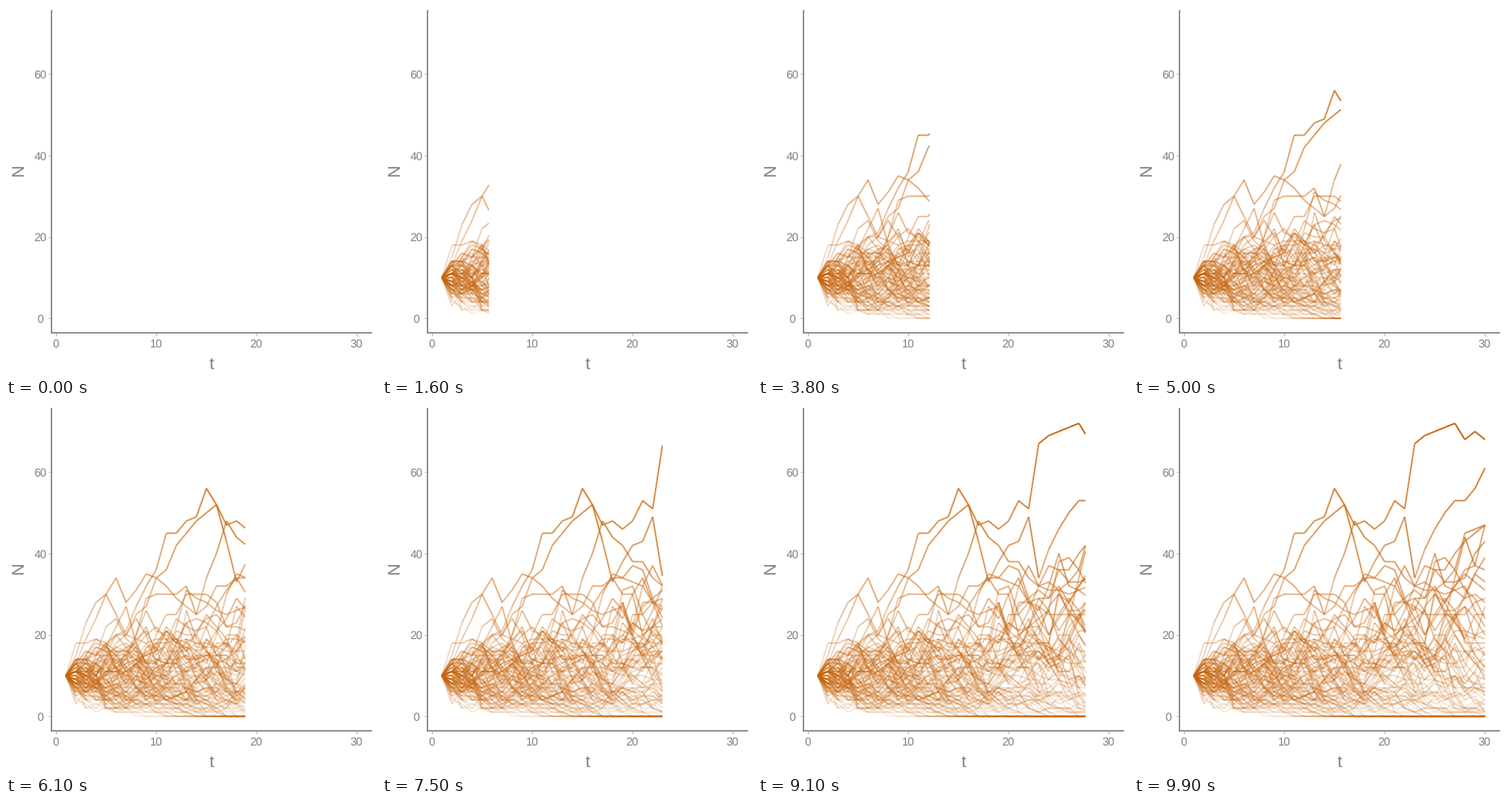
Recreate the animation shown at these times as a matplotlib script. Size 480 px wide and 480 px high, loop 10 s.

```python
import numpy as np
import matplotlib.pyplot as plt
from matplotlib.animation import FuncAnimation
from matplotlib.collections import LineCollection
from matplotlib.colors import to_rgb

SIZE, DPI = 480, 100
PT = 72 / DPI                       # points per pixel
FRAMES, STEPS = 100, 30
EXTINCT, SURVIVORS, POOL = 45, 51, 12000
ORANGE, GREY, PALE = "#C8640A", "#7F7F7F", "#B3B3B3"
TOP = 72

rng = np.random.default_rng(14)
t = np.arange(1, STEPS + 1)


def poisson_walks(count):
    """Populations of 10 where each member leaves Poisson(1) offspring."""
    walks = np.full((count, STEPS), 10)
    for i in range(1, STEPS):
        walks[:, i] = rng.poisson(walks[:, i - 1])
    return walks


def crowd():
    """Walks below the leaders, with exponentially spread final sizes."""
    pool = poisson_walks(POOL)
    ceiling = np.interp(t, [1, 2, 5, 10, 18, 30], [10, 14, 22, 37, 36, 47])
    lifespan = (pool > 0).sum(axis=1)
    keep = (np.all(pool <= ceiling, axis=1) & (pool[:, 1] > 2)
            & (lifespan >= rng.uniform(5, 16, POOL)))
    pool = pool[keep]
    ends = pool[:, -1].astype(float)
    q = (np.arange(SURVIVORS) + 0.5) / SURVIVORS
    sizes = np.clip(-16 * np.log(1 - q), 1, 47)
    for want in [*np.zeros(EXTINCT), *sizes]:
        pick = np.argmin(np.abs(ends - want))
        ends[pick] = np.inf
        yield pool[pick]


def leader(*keys):
    """Path through key points (t, n) with a slight wobble between them."""
    kt, kn = zip(*keys)
    n = np.interp(t, kt, kn)
    wobble = rng.normal(0, 0.2, STEPS) * np.sqrt(n)
    return np.round(n + np.where(np.isin(t, kt), 0, wobble)).clip(0)


leaders = [
    leader((1, 10), (7, 21), (10, 36), (11, 45), (14, 49), (15, 56), (17, 47),
           (22, 51), (23, 67), (27, 72), (30, 68)),
    leader((1, 10), (2, 18), (7, 20), (11, 36), (14, 48), (16, 52), (18, 33),
           (22, 49), (23, 34), (25, 46), (30, 61)),
    leader((1, 10), (4, 28), (5, 30), (7, 20), (14, 16), (30, 6)),
    leader((1, 10), (4, 24), (6, 34), (7, 28), (9, 35), (14, 25), (17, 48),
           (22, 34), (30, 28)),
]
paths = np.array([*leaders, *crowd()], float)
rgb = to_rgb(ORANGE)


def revealed(tip):
    """Segments and colours of all paths up to time `tip`."""
    segs, colors = [], []
    for n in paths:
        for i in range(STEPS - 1):
            part = min(tip - t[i], 1)
            if part <= 1e-9:
                break
            end = n[i] + part * (n[i + 1] - n[i])
            segs.append([(t[i], n[i]), (t[i] + part, end)])
            colors.append((*rgb, 0.1 + 0.9 * n[i] / TOP))
    return segs, colors


plt.rcParams["font.family"] = "Liberation Sans"
plt.rcParams["text.hinting"] = "none"
fig = plt.figure(figsize=(SIZE / DPI, SIZE / DPI), dpi=DPI, facecolor="white")

left, right, top, bottom = 58.8, 474.2, 6.1, 424.1
ax = fig.add_axes([left / SIZE, 1 - bottom / SIZE,
                   (right - left) / SIZE, (bottom - top) / SIZE])
ax.set_xlim(-0.45, 31.45)
ax.set_ylim(-3.6, 75.6)
ax.set_xticks(range(0, 31, 10), labels=[])
ax.set_yticks(range(0, 61, 20), labels=[])
ax.tick_params(length=4 * PT, width=1 * PT, color=PALE)
for side in ("top", "right"):
    ax.spines[side].set_visible(False)
for side in ("left", "bottom"):
    ax.spines[side].set(color=GREY, linewidth=1.7 * PT)


def label(x, y, text, size, va="center_baseline", **kw):
    fig.text(x / SIZE, 1 - y / SIZE, text, fontsize=size * PT, color=GREY,
             ha="center", va=va, **kw)


for v in range(0, 31, 10):
    label(64.4 + 13.02 * v, 437.3, str(v), 14.6)
for v in range(0, 61, 20):
    label(44.4, 405.5 - 5.28 * v, str(v), 14.6)
label(266.5, 463, "t", 22)
label(16.6, 213.5, "N", 22, va="center", rotation=90)

lines = LineCollection([], linewidths=2 * PT, capstyle="butt", snap=False)
ax.add_collection(lines, autolim=False)


def draw(frame):
    segs, colors = revealed(1 + (STEPS - 1) * frame / (FRAMES - 1))
    lines.set_segments(segs)
    lines.set_color(colors)
    return [lines]


anim = FuncAnimation(fig, draw, frames=FRAMES, interval=100, repeat=True,
                     repeat_delay=0)
plt.show()
```
